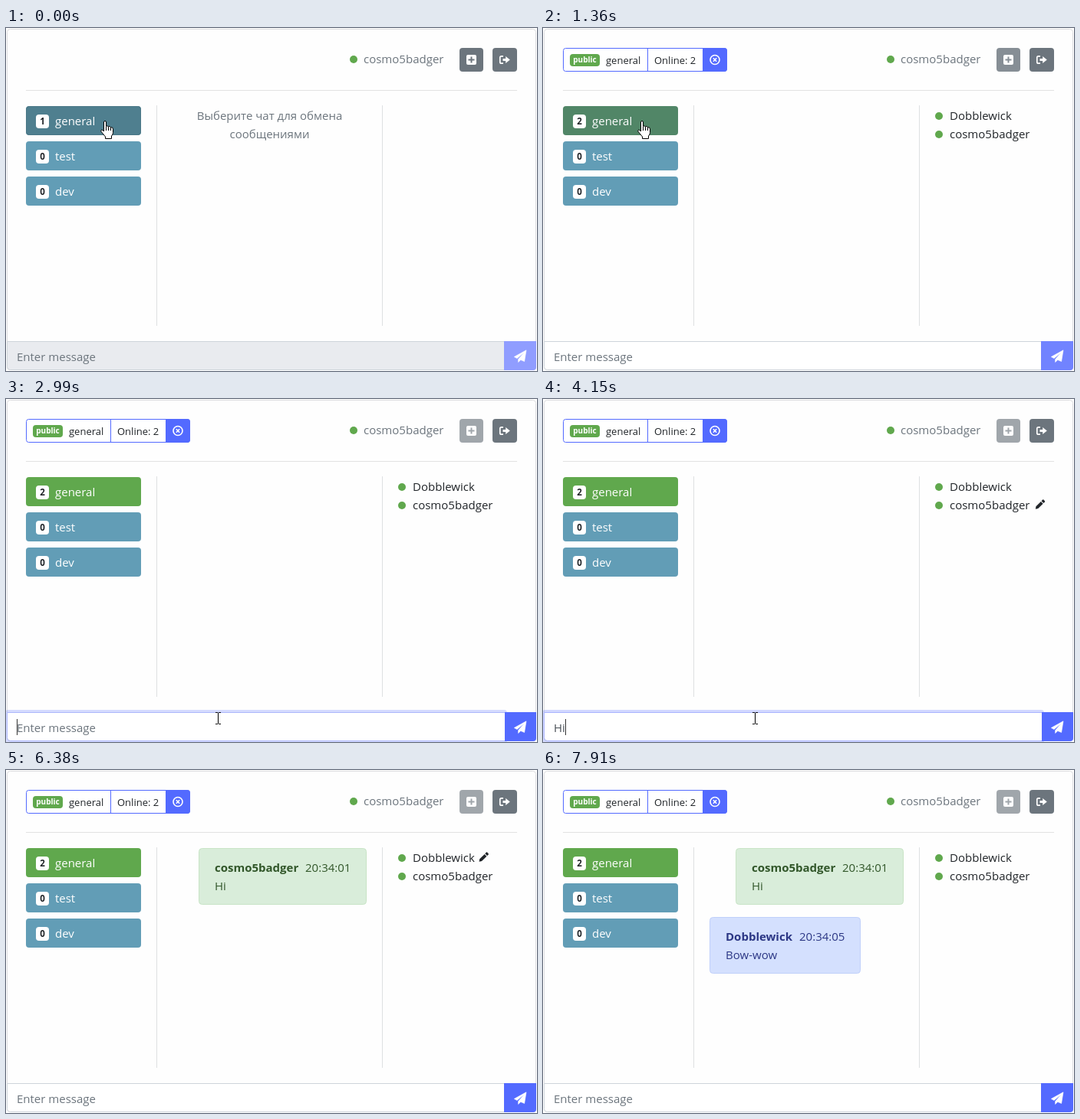
Write an HTML page with a canvas that moves like this. It is 692 px wide and 448 px high and loops after 8 s.

```html
<!DOCTYPE html>
<html lang="ru">
<head>
<meta charset="utf-8">
<title>Chat</title>
<style>
html, body { margin: 0; width: 692px; height: 448px; overflow: hidden; background: #fff; }
canvas { display: block; }
</style>
</head>
<body>
<canvas id="stage" width="692" height="448"></canvas>
<script>
const ctx = document.getElementById('stage').getContext('2d');
const LOOP = 8000;
const ME = 'cosmo5badger', PEER = 'Dobblewick';
const BLUE = '#536aff', GREEN = '#60a84d', TEAL = '#629db6', TEAL_DARK = '#4f7f8f';
const GREY = '#6c757d', INK = '#212529';

const HAND = new Path2D('M4.5 14V2Q4.5 .5 6 .5Q7.5 .5 7.5 2V7.5Q9 6 10.5 7.7Q12 6.8 13.3 8.5Q16.5 8.3 16.5 11V15.5Q16.5 18 14.5 20V23.5H6.5V21L1.2 14.5Q0 12.5 1.7 12Q3 12 4.5 14ZM7.5 8V13M10.5 8V13M13.5 9V13');
const ARROW = new Path2D('M.5 .5V16.5L4.2 13L6.6 18.6L9 17.5L6.6 12H11.8Z');
const PLANE = new Path2D('M16 .3L.3 9L4 11L13.4 3.2L5.6 12.3V16L8.8 13L13.6 15Z');
const PENCIL = new Path2D('M.3 12.7L.9 9.3L7.3 2.9L10.1 5.7L3.7 12.1ZM8 2.2L9.6 .6Q10.2 .1 10.8 .6L12.4 2.2Q12.9 2.8 12.4 3.4L10.8 5Z');
const EXIT = new Path2D('M5 .8H2.6Q.8 .8 .8 2.6V8.4Q.8 10.2 2.6 10.2H5');
const EXIT_ARROW = new Path2D('M4.5 3.9H8.2V.9L13.8 5.5L8.2 10.1V7.1H4.5Z');

// time, x, y of the pointer's hot spot, shape
const POINTER = [
  [0, 129, 121, 'hand'], [1740, 131, 122, 'hand'], [1860, 134, 124, 'hand'],
  [2010, 158, 177, 'hand'], [2130, 162, 183, 'hand'], [2250, 180, 225, 'arrow'],
  [2370, 214, 290, 'arrow'], [2490, 247, 358, 'arrow'], [2610, 279, 418, 'beam'],
  [2730, 277, 417, 'beam'], [4680, 0, 0, 'none']
];

const between = (t, a, b) => t >= a && t < b;

function font(size, weight = 400) {
  ctx.font = `${weight} ${size}px "Open Sans", "Noto Sans", sans-serif`;
}

function text(str, x, y, color, size = 15, weight = 400, align = 'left') {
  font(size, weight);
  ctx.textAlign = align;
  ctx.fillStyle = color;
  ctx.fillText(str, x, y);
}

function box(x, y, w, h, r, fill, line) {
  ctx.beginPath();
  if (line) ctx.roundRect(x + .5, y + .5, w - 1, h - 1, r);
  else ctx.roundRect(x, y, w, h, r);
  if (fill) { ctx.fillStyle = fill; ctx.fill(); }
  if (line) { ctx.strokeStyle = line; ctx.lineWidth = 1; ctx.stroke(); }
}

function rect(x, y, w, h, color) {
  ctx.fillStyle = color;
  ctx.fillRect(x, y, w, h);
}

function dot(x, y) {
  ctx.beginPath();
  ctx.arc(x, y, 5, 0, 7);
  ctx.fillStyle = GREEN;
  ctx.fill();
}

function shape(path, x, y, fill, line, width = 1) {
  ctx.save();
  ctx.translate(x, y);
  ctx.lineJoin = 'round';
  if (fill) { ctx.fillStyle = fill; ctx.fill(path); }
  if (line) { ctx.strokeStyle = line; ctx.lineWidth = width; ctx.stroke(path); }
  ctx.restore();
}

function header(t, joined) {
  dot(453, 41);
  text(ME, 466, 46, GREY);
  const plus = !joined ? GREY : t < 1490 ? '#868e95' : '#a0a6ab';
  box(591, 26, 31, 31, 4, plus);
  box(600, 35, 13, 13, 2, '#fff');
  rect(602.5, 40.5, 8, 2, plus);
  rect(605.5, 37.5, 2, 8, plus);
  box(634, 26, 32, 31, 4, GREY);
  shape(EXIT, 643, 36, null, '#fff', 1.7);
  shape(EXIT_ARROW, 643, 36, '#fff');
  rect(26, 81, 640, 1, '#e2e2e2');
  rect(196, 101, 1, 288, '#dee0e2');
  rect(490, 101, 1, 288, '#dee0e2');
}

function roomBar() {
  box(26, 26, 214, 31, 3, '#fff', BLUE);
  rect(136, 26, 1, 31, BLUE);
  ctx.beginPath();
  ctx.roundRect(208, 26, 32, 31, [0, 4, 4, 0]);
  ctx.fillStyle = BLUE;
  ctx.fill();
  box(35, 34, 39, 16, 4, GREEN);
  text('public', 54.5, 45, '#fff', 10, 700, 'center');
  text('general', 82, 47, INK, 13);
  text('Online: 2', 145, 47, INK, 13);
  ctx.strokeStyle = '#fff';
  ctx.lineWidth = 1.6;
  ctx.beginPath();
  ctx.arc(224, 41.5, 6, 0, 7);
  ctx.moveTo(221.8, 39.3); ctx.lineTo(226.2, 43.7);
  ctx.moveTo(226.2, 39.3); ctx.lineTo(221.8, 43.7);
  ctx.stroke();
}

function rooms(t, joined) {
  const first = !joined ? TEAL_DARK : t < 1490 ? '#518667' : t < 2130 ? '#528d3e' : GREEN;
  const list = [
    ['general', joined ? 2 : 1, first],
    ['test', 0, between(t, 2130, 2250) ? TEAL_DARK : TEAL],
    ['dev', 0, TEAL]
  ];
  list.forEach(([name, count, color], i) => {
    const y = 102 + 46 * i;
    box(26, y, 150, 38, 4, color);
    if (i === 0 && !joined) box(26, y, 150, 38, 4, null, '#4a7786');
    box(39, y + 11, 17, 18, 4, '#fff');
    text(count, 47.5, y + 24, INK, 11.5, 700, 'center');
    text(name, 64, y + 25, '#fff');
  });
}

function pencil(x, y, age) {
  const slide = 2.5 * (1 - Math.cos(age * Math.PI / 800));
  shape(PENCIL, x + slide, y, INK);
}

function users(t) {
  [PEER, ME].forEach((name, i) => {
    dot(516, 115 + 24 * i);
    text(name, 530, 120 + 24 * i, INK);
  });
  if (between(t, 3640, 4280)) pencil(638, 131, t - 3640);
  if (between(t, 6380, 7910)) pencil(616.3, 107, t - 6380);
}

function message(x, y, w, gap, name, time, body, fill, line, ink) {
  box(x, y, w, 74, 4, fill, line);
  text(name, x + 21, y + 31, ink, 15, 700);
  text(time, x + gap, y + 31, ink);
  text(body, x + 21, y + 55, ink);
}

function glowLevel(t) {
  if (t < 2860 || t >= 5790) return 0;
  if (t < 2990 || t >= 5670) return .5;
  return t < 3110 ? .9 : 1;
}

function inputRow(t, joined) {
  const glow = glowLevel(t);
  if (glow) box(-1, 406, 654, 44, 4, `rgba(83,106,255,${.26 * glow})`);
  ctx.beginPath();
  ctx.roundRect(1.5, 409.5, 649, 37, [0, 0, 0, 4]);
  ctx.fillStyle = joined ? '#fff' : '#e9ebef';
  ctx.fill();
  ctx.lineWidth = 1;
  ctx.strokeStyle = '#ced4da';
  ctx.stroke();
  if (glow) {
    ctx.strokeStyle = `rgba(169,180,255,${glow})`;
    ctx.stroke();
  }
  const send = !joined ? '#909dff' : t < 1490 ? '#7183ff' : BLUE;
  const left = glow ? 650 : 649;
  ctx.beginPath();
  ctx.roundRect(left, 409, 691 - left, 38, [0, 0, 4, 0]);
  ctx.fillStyle = send;
  ctx.fill();
  shape(PLANE, 662, 420.5, '#fff', '#fff', .6);

  const typed = between(t, 3640, 4280) ? (t < 3880 ? 'H' : 'Hi') : '';
  text(typed || 'Enter message', 14, 435, typed ? '#495057' : GREY);
  const caretOn = between(t, 2860, 3390) || between(t, 3640, 4830) || between(t, 5270, 5670);
  if (caretOn) {
    font(15);
    const x = 14 + (typed ? Math.round(ctx.measureText(typed).width) : 0);
    rect(x, 418, 1, 21, '#333');
  }
}

function tooltip() {
  ctx.save();
  ctx.shadowColor = 'rgba(0,0,0,.35)';
  ctx.shadowBlur = 3;
  ctx.shadowOffsetX = ctx.shadowOffsetY = 2;
  rect(138, 136, 52, 21, '#fff');
  ctx.restore();
  box(138, 136, 52, 21, 0, '#fff', '#767676');
  text('general', 164, 150, '#575757', 11, 400, 'center');
}

function pointer(t) {
  const [, x, y, kind] = POINTER.filter(p => p[0] <= t).pop();
  if (kind === 'hand') shape(HAND, x - 6, y, '#fff', '#000');
  if (kind === 'arrow') shape(ARROW, x, y, '#fff', '#000');
  if (kind === 'beam') {
    rect(x - 1, y - 7, 1, 14, '#000');
    for (const end of [y - 8, y + 7]) {
      rect(x - 4, end, 3, 1, '#000');
      rect(x, end, 3, 1, '#000');
    }
  }
}

function draw(t) {
  const joined = t >= 1360;
  rect(0, 0, 692, 448, '#fff');
  box(1, 1, 690, 446, 4, '#fefefe', '#dcdcde');
  header(t, joined);
  rooms(t, joined);
  if (joined) {
    roomBar();
    users(t);
  } else {
    text('Выберите чат для обмена', 343.5, 120, GREY, 15, 400, 'center');
    text('сообщениями', 343.5, 144, GREY, 15, 400, 'center');
  }
  if (t >= 4280) message(251, 102, 219, 139, ME, '20:34:01', 'Hi', '#d9edda', '#c8e4c6', '#32572a');
  if (t >= 7910) message(217, 192, 197, 117, PEER, '20:34:05', 'Bow-wow', '#d4e0fe', '#c0d0fa', '#2c3785');
  inputRow(t, joined);
  if (between(t, 400, 1210)) tooltip();
  pointer(t);
}

const start = performance.now();
function tick() {
  draw((performance.now() - start) % LOOP);
  requestAnimationFrame(tick);
}
tick();
</script>
</body>
</html>
```
